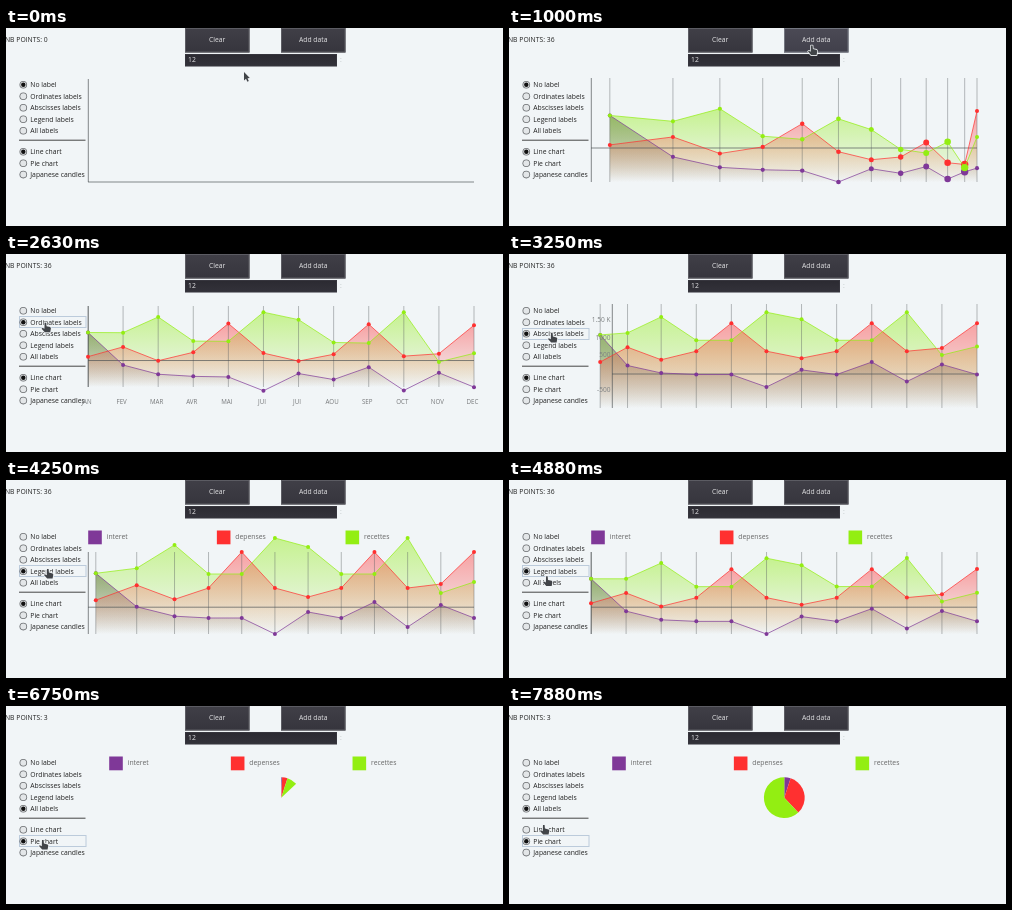
Recreate the animation shown at these times as an HTML page with a canvas. Size 497 by 198 pixels, loop 8000 ms.

```html
<!DOCTYPE html>
<html lang="en">
<head>
<meta charset="utf-8">
<title>Chart demo</title>
<style>
html, body { margin: 0; width: 100%; height: 100%; overflow: hidden; background: #f1f5f7; }
canvas { display: block; width: 497px; height: 198px; }
</style>
</head>
<body>
<canvas id="stage"></canvas>
<script>
const W = 497, H = 198, LOOP = 8000;
const canvas = document.getElementById('stage');
const ratio = window.devicePixelRatio || 1;
canvas.width = W * ratio;
canvas.height = H * ratio;
const ctx = canvas.getContext('2d');

const RIGHT = 468, TOP = 50, BOTTOM = 154, ZERO = 34, SPAN = 104;
const ADD_AT = 740, PIE_AT = 6700;
const AXIS = 'rgba(75,80,83,.85)', GRID = 'rgba(90,95,98,.6)';
const MONTHS = ['JAN', 'FEV', 'MAR', 'AVR', 'MAI', 'JUI', 'JUI', 'AOU', 'SEP', 'OCT', 'NOV', 'DEC'];

// Heights above the chart floor, in units of the full-size chart.
const SERIES = [
  { name: 'interet', color: '#7f3898', fill: '60,45,65', alpha: 0.5,
    data: [70, 29, 18, 16, 16, 0, 22, 16, 32, 7, 29, 16] },
  { name: 'depenses', color: '#ff3030', fill: '255,60,60', alpha: 0.45,
    data: [39, 52, 35, 46, 82, 46, 37, 46, 82, 46, 50, 82] },
  { name: 'recettes', color: '#93ee12', fill: '150,238,30', alpha: 0.48,
    data: [70, 70, 90, 60, 60, 96, 87, 60, 60, 96, 41, 52] }
];

const LAYOUTS = [
  { at: 0, left: 82, top: TOP, bottom: BOTTOM, row: 0 },
  { at: 2320, left: 82, top: 52, bottom: 133, row: 1, months: true },
  { at: 3219, left: 103, top: TOP, bottom: BOTTOM, row: 2, values: true },
  { at: 4196, left: 82, top: 72, bottom: BOTTOM, row: 3, legend: true },
  { at: 5215, left: 103, top: 74, bottom: 132, row: 4, months: true, values: true, legend: true }
];

const RADIOS = [
  ['No label', 56.7], ['Ordinates labels', 68.2], ['Abscisses labels', 79.7], ['Legend labels', 91.2],
  ['All labels', 102.7], ['Line chart', 123.8], ['Pie chart', 135.2], ['Japanese candles', 146.6]
];

// Pointer stops: time, x, y
const PATH = [
  [0, 238, 44], [130, 238, 44], [380, 302, 17.5], [1560, 302, 17.5], [2060, 38, 72], [2130, 38, 72],
  [2250, 38, 68], [2900, 39, 69], [3200, 42, 79], [3500, 42, 79], [3950, 41, 89],
  [4600, 41, 89], [5170, 33, 104], [6180, 33, 104], [6380, 36, 134], [7560, 36, 134],
  [7880, 34, 119], [8000, 34, 119]
];

const clamp = x => Math.max(0, Math.min(1, x));
const mix = (a, b, p) => a + (b - a) * p;

function text(str, x, y, color = '#222', align = 'left', size = 6.8) {
  ctx.font = size + 'px "Open Sans", "Noto Sans", sans-serif';
  ctx.textAlign = align;
  ctx.textBaseline = 'alphabetic';
  ctx.fillStyle = color;
  ctx.fillText(str, x, y + 2.3);
}

function line(x1, y1, x2, y2, color, width = 1) {
  ctx.strokeStyle = color;
  ctx.lineWidth = width;
  ctx.beginPath();
  ctx.moveTo(x1, y1);
  ctx.lineTo(x2, y2);
  ctx.stroke();
}

function disc(x, y, r, color) {
  ctx.fillStyle = color;
  ctx.beginPath();
  ctx.arc(x, y, r, 0, Math.PI * 2);
  ctx.fill();
}

function panel(x, y, w, h, from, to, edge) {
  const g = ctx.createLinearGradient(0, y, 0, y + h);
  g.addColorStop(0, from);
  g.addColorStop(1, to);
  ctx.fillStyle = g;
  ctx.fillRect(x, y, w, h);
  ctx.strokeStyle = edge;
  ctx.lineWidth = 1;
  ctx.strokeRect(x + 0.5, y + 0.5, w - 1, h - 1);
}

function button(label, x, hover) {
  if (hover) panel(x, 0, 64.5, 24.5, '#4b4a55', '#41404b', '#737680');
  else panel(x, 0, 64.5, 24.5, '#403f47', '#36353d', '#5c5c63');
  text(label, x + 32.2, 11.7, '#e4e4e6', 'center');
}

function controls(t, row) {
  const count = t < ADD_AT ? 0 : t < PIE_AT ? 36 : 3;
  text('NB POINTS: ' + count, -1, 11.7);
  button('Clear', 179, false);
  button('Add data', 275, t > 330 && t < 1640);
  panel(179, 26, 152, 12.3, '#2b2a31', '#33323a', '#36353d');
  text('12', 182, 32, '#e4e4e6');
  text(':', 334, 31.5, '#b9bdc0');

  const pie = t >= PIE_AT;
  const focus = pie ? 6 : row;
  if (focus) {
    ctx.strokeStyle = '#bccbdb';
    ctx.lineWidth = 1;
    ctx.strokeRect(13.5, Math.round(RADIOS[focus][1]) - 5.5, 66.5, 11);
  }
  RADIOS.forEach(([label, y], i) => {
    disc(17.3, y, 3.8, '#6b6e71');
    disc(17.3, y, 3, '#e3e6e8');
    if (i === row || i === (pie ? 6 : 5)) disc(17.3, y, 2.2, '#111');
    text(label, 24.3, y);
  });
  line(13, 112.2, 79.5, 112.2, '#444');
}

const place = (box, i, v) => [
  mix(box.left, RIGHT, i / 11),
  box.bottom - v * (box.bottom - box.top) / SPAN
];

function point(t, n, i, v) {
  const goal = place(LAYOUTS[n], i, v);
  let from, p;
  if (n === 0) {
    const speed = i === 11 ? 2 : 3 - Math.pow(i, 0.41);
    from = [RIGHT, BOTTOM];
    p = 1 - Math.exp(-speed * Math.pow((t - ADD_AT) / 260, 1.8));
  } else {
    const rate = 0.009 * (1 + 1 / (1 + i) ** 2);
    from = place(LAYOUTS[n - 1], i, v);
    p = 1 - Math.exp(-rate * Math.max(0, t - LAYOUTS[n].at - 25 * i));
  }
  return {
    x: mix(from[0], goal[0], p),
    y: mix(from[1], goal[1], p),
    r: 2 + (n === 0 ? 5 * Math.pow(1 - p, 2.5) : 0)
  };
}

function trace(pts) {
  ctx.beginPath();
  pts.forEach(p => ctx.lineTo(p.x, p.y));
}

function shade(pts, s, floor) {
  const peak = Math.min(...pts.map(p => p.y));
  const g = ctx.createLinearGradient(0, peak, 0, Math.max(floor, peak + 1));
  g.addColorStop(0, `rgba(${s.fill},${s.alpha})`);
  g.addColorStop(1, `rgba(${s.fill},0)`);
  trace(pts);
  ctx.lineTo(pts[11].x, floor);
  ctx.lineTo(pts[0].x, floor);
  ctx.fillStyle = g;
  ctx.fill();
}

function legend(left) {
  SERIES.forEach((s, k) => {
    const x = left + k * (RIGHT - left) / 3;
    ctx.fillStyle = s.color;
    ctx.fillRect(x + 0.2, 50.5, 13.6, 13.8);
    text(s.name, x + 18.7, 57, '#666');
  });
}

function lineChart(t, n) {
  const box = LAYOUTS[n];
  const scale = (box.bottom - box.top) / SPAN;
  const zero = box.bottom - ZERO * scale;
  const lines = SERIES.map(s => s.data.map((v, i) => point(t, n, i, v)));

  [0, 2, 1].forEach(k => shade(lines[k], SERIES[k], box.bottom));

  lines[0].forEach(p => line(p.x, box.top, p.x, box.bottom, GRID, 0.7));
  line(box.left + 0.3, box.top, box.left + 0.3, box.bottom, AXIS, 0.8);
  line(box.left, zero, RIGHT, zero, AXIS, 0.8);

  lines.forEach((pts, k) => {
    trace(pts);
    ctx.strokeStyle = SERIES[k].color;
    ctx.lineWidth = 0.7;
    ctx.stroke();
    pts.forEach(p => disc(p.x, p.y, p.r, SERIES[k].color));
  });

  if (box.values) {
    [['1.50 K', 3], ['1000', 2], ['500', 1], ['-500', -1]].forEach(([label, step]) =>
      text(label, 101.5, zero - 1.5 - step * 17.6 * scale, '#7d8082', 'right', 6.6));
  }
  if (box.months) {
    MONTHS.forEach((m, i) => text(m, lines[0][i].x - 1.5, 147.5, '#77797b', 'center', 6.2));
  }
  if (box.legend) legend(box.left);
}

function pieChart(t) {
  const grow = 1 - Math.pow(1 - clamp((t - PIE_AT) / 1130), 3);
  let a = -Math.PI / 2;
  [0.05, 0.33, 0.62].forEach((part, k) => {
    const b = a + part * grow * Math.PI * 2;
    ctx.fillStyle = SERIES[k].color;
    ctx.beginPath();
    ctx.moveTo(275.3, 91.7);
    ctx.arc(275.3, 91.7, 20.4, a, b);
    ctx.fill();
    a = b;
  });
  legend(103);
}

const ARROW = [[0, 0], [0, 8.6], [2, 6.8], [3.4, 9.8], [4.8, 9.1], [3.5, 6.2], [5.8, 6]];
const HAND = [[0, 0], [1.6, 0], [1.9, 3.6], [5.6, 4.4], [6.3, 5.6], [5.6, 9.6], [0.2, 9.6],
  [-3, 6], [-2.2, 5.2], [-0.2, 6.2]];

function pointer(t) {
  const k = Math.max(1, PATH.findIndex(s => s[0] >= t));
  const [t0, x0, y0] = PATH[k - 1], [t1, x1, y1] = PATH[k];
  const u = clamp((t - t0) / (t1 - t0));
  const p = u * u * (3 - 2 * u);
  ctx.save();
  ctx.translate(mix(x0, x1, p), mix(y0, y1, p));
  ctx.beginPath();
  (t < 330 ? ARROW : HAND).forEach(q => ctx.lineTo(q[0], q[1]));
  ctx.closePath();
  ctx.lineJoin = 'round';
  ctx.strokeStyle = 'rgba(240,243,245,.9)';
  ctx.lineWidth = 1.6;
  ctx.stroke();
  ctx.fillStyle = '#414448';
  ctx.fill();
  ctx.restore();
}

function draw(t) {
  ctx.setTransform(ratio, 0, 0, ratio, 0, 0);
  ctx.fillStyle = '#f1f5f7';
  ctx.fillRect(0, 0, W, H);
  const n = LAYOUTS.filter(l => l.at <= t).length - 1;
  controls(t, LAYOUTS[n].row);
  if (t < ADD_AT) {
    line(82.3, 51, 82.3, 154, AXIS, 0.8);
    line(82, 154, RIGHT, 154, AXIS, 0.8);
  } else if (t < PIE_AT) {
    lineChart(t, n);
  } else {
    pieChart(t);
  }
  pointer(t);
}

const start = performance.now();
function tick(now) {
  draw(Math.max(0, now - start) % LOOP);
  requestAnimationFrame(tick);
}
draw(0);
requestAnimationFrame(tick);
</script>
</body>
</html>
```
